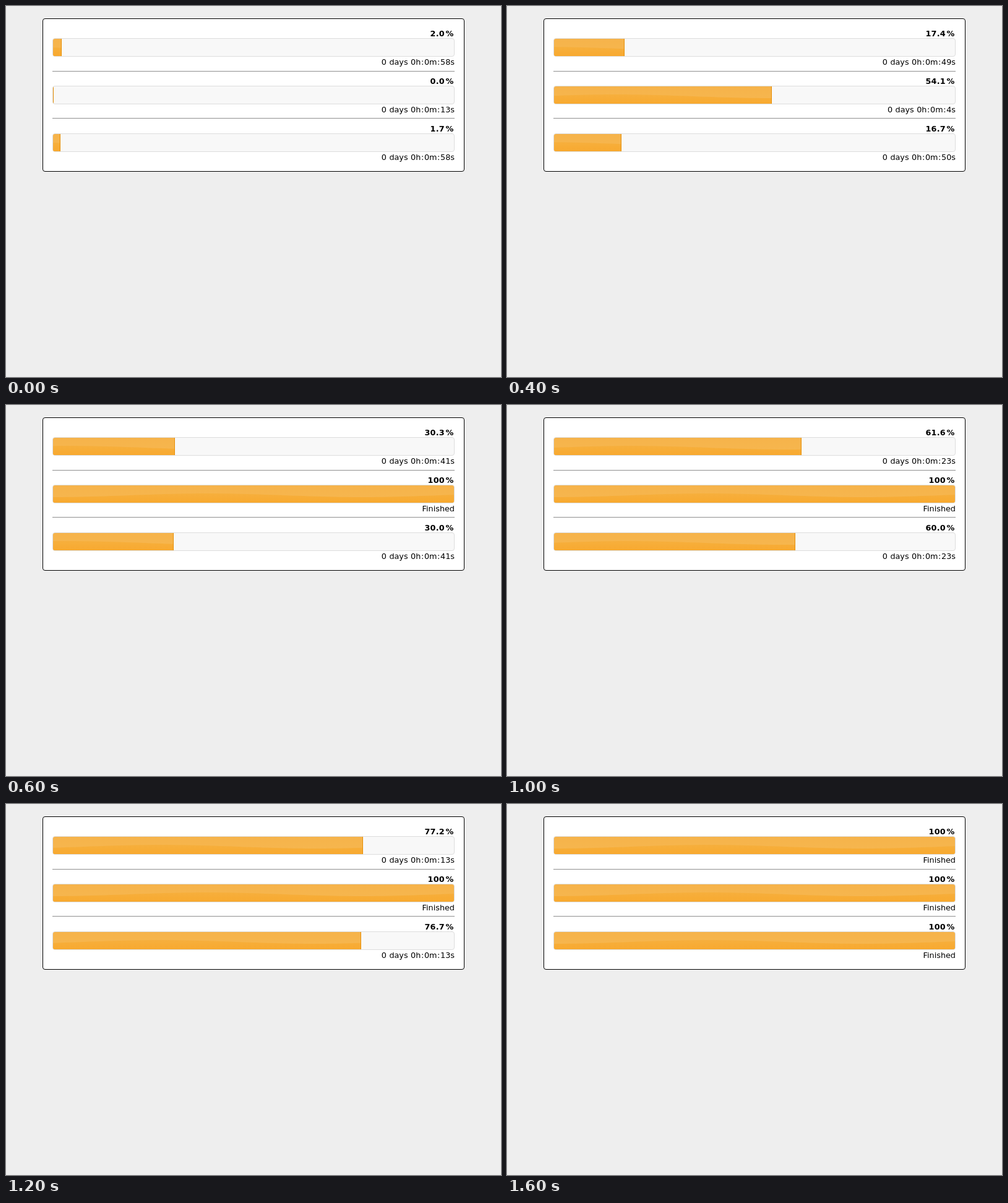
Write an HTML page that moves like this. It is 800 px wide and 600 px high and loops after 4 s.

```html
<!DOCTYPE html>
<html lang="en">
<head>
<meta charset="utf-8">
<title>Progress bars</title>
<style>
  html, body { margin: 0; height: 100%; overflow: hidden; background: #eee; }
  body { font: 12.8px/15px Verdana, "DejaVu Sans", sans-serif; color: #000; }
  #panel {
    position: absolute; left: 59px; top: 20px; width: 680px; height: 246px;
    border: 1px solid #000; border-radius: 4px; background: #fff;
  }
  .row { position: absolute; left: 15px; width: 650px; height: 30px; }
  .percent, .time { position: absolute; right: 0; white-space: pre; }
  .percent { top: -15px; font-weight: bold; letter-spacing: .2px; }
  .percent i { font-style: normal; letter-spacing: 0; padding: 0 .13em; }
  .time { top: 31px; word-spacing: .4px; }
  .time i { font-style: normal; padding: 0 .05em; }
  .bar {
    position: absolute; inset: 0; box-sizing: border-box; overflow: hidden;
    border: 1px solid #ddd; border-radius: 4px; background: #f8f8f8;
  }
  .value {
    position: absolute; left: 0; top: 0; height: 28px; overflow: hidden;
    border-right: 1px solid #e78f08;
  }
  .value svg { position: absolute; top: 0; left: 0; }
  .rule {
    position: absolute; left: 15px; width: 650px; height: 1px;
    background: #9a9a9a; border-bottom: 1px solid #eee;
  }
</style>
</head>
<body>
<svg width="0" height="0" style="position:absolute">
  <linearGradient id="light" x2="0" y2="1">
    <stop stop-color="#f6b34a"/><stop offset="1" stop-color="#f6b750"/>
  </linearGradient>
  <linearGradient id="deep" x2="0" y2="1">
    <stop stop-color="#f6af3d"/><stop offset="1" stop-color="#f8a92f"/>
  </linearGradient>
</svg>
<div id="panel"></div>
<script>
const STEP = 200, LOOP = 4000, WIDTH = 648, TILE = 500;
const panel = document.getElementById("panel");

// One state per step; the last one of each list stays until the loop ends.
const main = [2, 9.7, 17.4, 30.3, 46, 61.6, 77.2, 92.4, 100];
const tasks = [
  { percent: main, left: [58, 54, 49, 41, 32, 23, 13, 4] },
  { percent: [0, 27, 54.1, 100], left: [13, 8, 4] },
  // This task advances in whole seconds of a minute.
  { percent: main.map(p => Math.floor(p * 0.6) / 0.6),
    left: [58, 54, 50, 41, 32, 23, 13, 4] }
];

function wavePath() {
  let d = "M0 28";
  for (let x = 0; x <= 3 * TILE; x += 10) {
    const y = 16 - 3 * Math.cos((x - 175) / TILE * 2 * Math.PI);
    d += `L${x} ${y.toFixed(2)}`;
  }
  return d + `V28Z`;
}

function add(className, top, html = "") {
  const el = document.createElement("div");
  el.className = className;
  el.style.top = top + "px";
  el.innerHTML = html;
  panel.append(el);
  return el;
}

const wave = wavePath();
const rows = tasks.map((task, i) => {
  const row = add("row", 31 + 77 * i, `
    <div class="percent"></div>
    <div class="bar"><div class="value">
      <svg width="1500" height="28">
        <rect width="1500" height="28" fill="url(#light)"/>
        <path d="${wave}" fill="url(#deep)"/>
      </svg>
    </div></div>
    <div class="time"></div>`);
  const find = s => row.querySelector(s);
  return { task, percent: find(".percent"), value: find(".value"),
           gloss: find("svg"), time: find(".time") };
});
[84, 160].forEach(y => add("rule", y));

function show({ task, percent, value, gloss, time }, step) {
  const p = task.percent[Math.min(step, task.percent.length - 1)];
  const done = p >= 100;
  const width = WIDTH * p / 100;
  percent.innerHTML = (done ? "100" : p.toFixed(1)) + "<i>%</i>";
  time.innerHTML = done ? "Finished"
    : `0 days 0h<i>:</i>0m<i>:</i>${task.left[step]}s`;
  value.style.width = width + "px";
  // The gloss is centred in the filled part and repeats sideways.
  gloss.style.left = (width - TILE) / 2 - TILE + "px";
}

let last = -1;
function frame(now) {
  const step = Math.floor(now % LOOP / STEP);
  if (step !== last) {
    rows.forEach(row => show(row, step));
    last = step;
  }
  requestAnimationFrame(frame);
}
frame(0);
</script>
</body>
</html>
```
